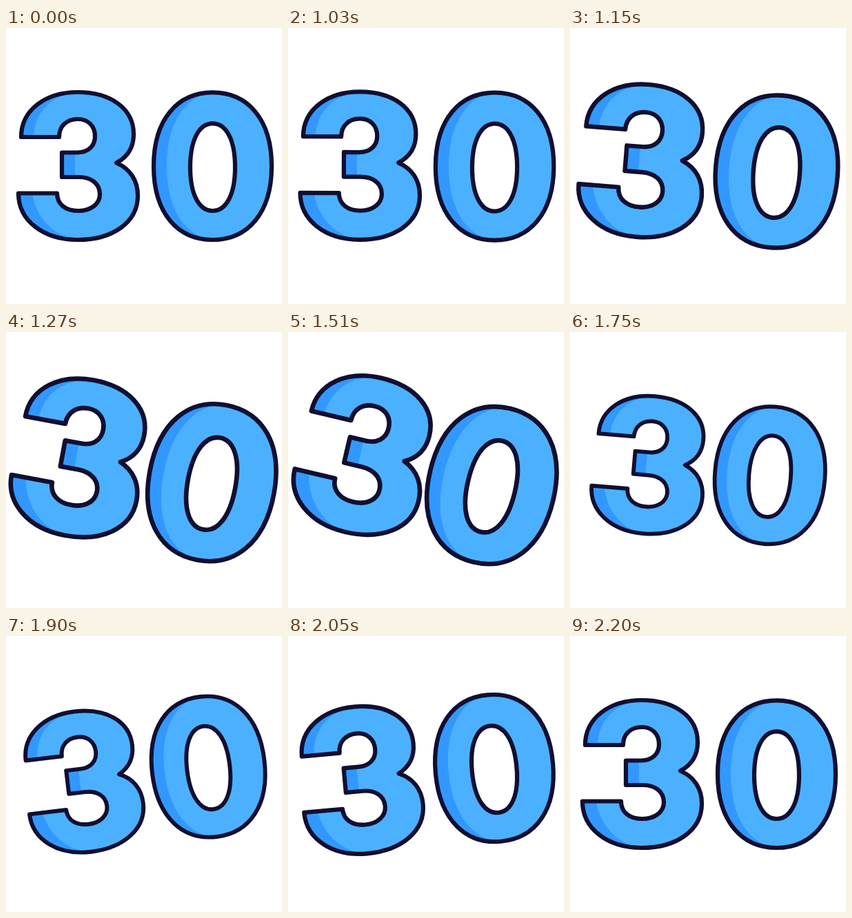
An HTML page for the animation above (2.23 s loop, 400x400 px).

```html
<!DOCTYPE html>
<html lang="en">
<head>
<meta charset="utf-8">
<title>Thirty</title>
<style>
  html, body { margin: 0; width: 100%; height: 100%; overflow: hidden; background: #fff; }
  svg { display: block; width: 100%; height: 100%; }
  .body { fill: #4bb1ff; }
  .shade { fill: #3298ff; }
  .line { fill: none; stroke: #110f30; stroke-width: 6.2; stroke-linejoin: round; }
</style>
</head>
<body>
<svg viewBox="0 0 400 400">
  <defs>
    <path id="three" d="M22 158C22 119 57 93 104 93C152 93 185 117 185 154C185 173 176 187 160 195.5C180 204 191 221 191 243C191 282 154 307 104 307C54 307 18 279 18 239.5H74C74 256 87 265 105 265C123 265 136 255 136 241C136 225 123 216 105 216H81V180.5H103C119 180.5 129 171 129 157C129 142 119 132 104 132C88 132 77 142 77 158Z"/>
    <path id="zero" fill-rule="evenodd"/>
  </defs>
  <g id="left">
    <use href="#three" class="body"/>
    <path class="shade" d="M22 158C22 119 57 93 104 93C66 97 41 122 40 158ZM18 239.5H38C42 270 66 302 104 307C54 307 18 279 18 239.5ZM81 180.5H100V216H81Z"/>
    <use href="#three" class="line"/>
  </g>
  <g id="right">
    <use href="#zero" class="body"/>
    <path id="rim" class="shade"/>
    <use href="#zero" class="line"/>
  </g>
</svg>
<script>
const LOOP = 2230, START = 1030, STEP = 30;
const CX = 202, CY = 200, HALF = 97.5;
const PIVOT_X = 202.5, PIVOT_Y = 200.2;
const byId = id => document.getElementById(id);
const left = byId('left'), right = byId('right');

// Half an oval from top to bottom; a negative rx bulges left.
function arc(x, y, rx, ry) {
  const kx = rx * 0.59, ky = ry * 0.64;
  return `M${x} ${y - ry}c${kx} 0 ${rx} ${ry - ky} ${rx} ${ry}s${kx - rx} ${ry} ${-rx} ${ry}`;
}
const oval = (x, y, rx, ry) => arc(x, y, rx, ry) + arc(x, y, -rx, ry);

const ZERO_X = CX + HALF;
byId('zero').setAttribute('d', oval(ZERO_X, 200.2, 85.5, 106.8) + oval(ZERO_X, 201.7, 32.5, 63.3));
byId('rim').setAttribute('d',
  arc(ZERO_X, 200.2, -85.5, 106.8) + 'C258 302 233 260 233 200S258 98 299.5 93.4Z');

// Smooth 0 to 1 between two times.
function ramp(t, from, to) {
  const u = Math.min(1, Math.max(0, (t - from) / (to - from)));
  return u * u * (3 - 2 * u);
}

const tiltAt = t => 13.2 * ramp(t, 1000, 1380) - 21.2 * ramp(t, 1600, 1950) + 8 * ramp(t, 1950, 2200);
const scaleAt = t => 1 + 0.071 * ramp(t, 1000, 1300) - 0.141 * ramp(t, 1540, 1770) + 0.07 * ramp(t, 1770, 2080);
const gapAt = t => 1 - 0.1 * ramp(t, 1400, 1760) + 0.1 * ramp(t, 1760, 2100);

function place(el, side, t) {
  const tilt = tiltAt(t), a = tilt * Math.PI / 180, r = side * HALF * gapAt(t);
  // The pivot drifts slightly off the resting centre while tilted.
  const lean = Math.min(1, Math.abs(tilt) / 8);
  const x = CX + (PIVOT_X - CX) * lean + r * Math.cos(a);
  const y = CY + (PIVOT_Y - CY) * lean + r * Math.sin(a);
  el.setAttribute('transform',
    `translate(${x} ${y}) rotate(${tilt}) scale(${scaleAt(t)}) translate(${-CX - side * HALF} ${-CY})`);
}

function draw(ms) {
  const t = ms % LOOP;
  const time = t < START ? 0 : START + Math.floor((t - START) / STEP) * STEP;
  place(left, -1, time);
  place(right, 1, time);
}

const begin = performance.now();
function tick() {
  draw(performance.now() - begin);
  requestAnimationFrame(tick);
}
tick();
</script>
</body>
</html>
```
